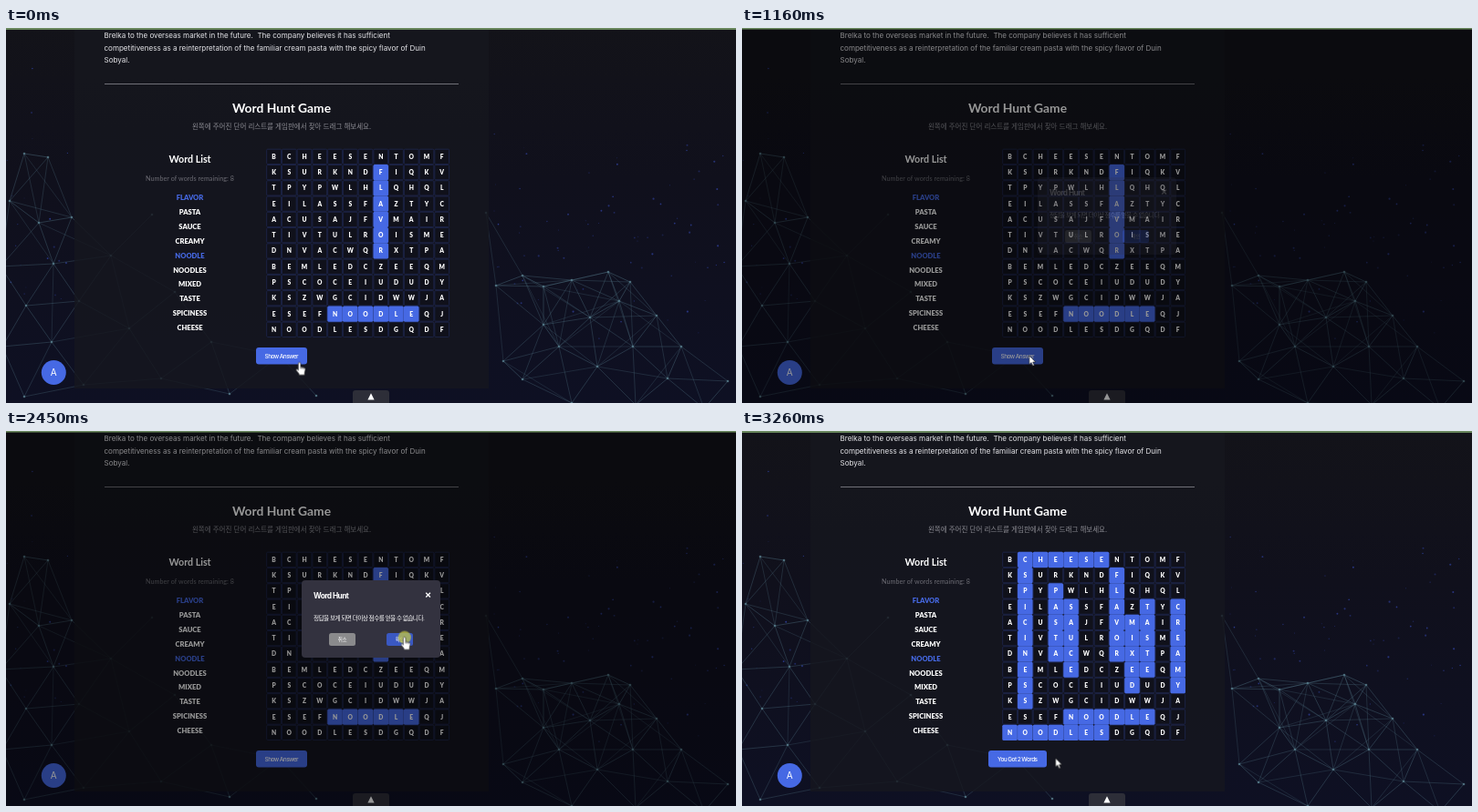
Recreate the animation shown at these times as an HTML page. Size 800x412 px, loop 3330 ms.

```html
<!DOCTYPE html>
<html lang="en">
<head>
<meta charset="utf-8">
<title>Word Hunt Game</title>
<style>
html, body { margin: 0; width: 100%; height: 100%; overflow: hidden; background: #0e0f1a; }
svg { display: block; width: 800px; height: 412px; }
text { white-space: pre; fill: #fff; }
.mid { text-anchor: middle; }
.body { font: 8.04px Inter, sans-serif; fill: #e6e6ea; }
.round { font-family: Lato, sans-serif; font-weight: 700; }
.heavy { font-weight: 900; }
.ko { font-family: "Noto Sans CJK KR", "Noto Sans CJK JP", "Noto Sans CJK", sans-serif; }
.tight { font: 500 6.5px Inter, sans-serif; letter-spacing: -.57px; }
.small { font-size: 5.6px; letter-spacing: -.5px; font-weight: 500; }
.blue { fill: #4669e4; }
.cell { fill: #10111b; stroke: #1f2850; stroke-width: .8; }

.cursor, .arrow, .hand, .tap, .shade, .dialog, .hover, .before, .after {
  animation: 3330ms step-end infinite;
}
.cursor { animation-name: travel; }
.arrow { animation-name: arrow; }
.hand { animation-name: hand; }
.tap { animation-name: tap; }
.shade { animation-name: shade; }
.dialog { animation-name: dialog; }
.hover { animation-name: hover; }
.before { animation-name: before; }
.after { animation-name: after; }

@keyframes travel {
  0% { transform: translate(321.8px, 367.5px); animation-timing-function: steps(8); }
  16.8% { transform: translate(314.8px, 360px); }
  46.5% { transform: translate(344px, 316.5px); animation-timing-function: steps(3); }
  52.8% { transform: translate(412px, 256px); animation-timing-function: steps(4); }
  61.2% { transform: translate(447px, 230.5px); animation-timing-function: steps(3); }
  67.5% { transform: translate(436.8px, 226.5px); }
  87.6% { transform: translate(436.8px, 226.5px); animation-timing-function: steps(2); }
  91.8% { transform: translate(386px, 302px); animation-timing-function: steps(3); }
  97.8%, 100% { transform: translate(343.6px, 359.5px); }
}
@keyframes arrow {
  0% { opacity: 0; } 34.5% { opacity: 1; } 63.3% { opacity: 0; } 95.7%, 100% { opacity: 1; }
}
@keyframes hand {
  0% { opacity: 1; } 34.5% { opacity: 0; } 63.3% { opacity: 1; } 95.7%, 100% { opacity: 0; }
}
@keyframes tap {
  0% { opacity: 0; } 26.4% { opacity: 1; } 32.7% { opacity: 0; }
  73.5% { opacity: 1; } 77.7%, 100% { opacity: 0; }
}
@keyframes shade {
  0% { opacity: 0; } 32.7% { opacity: .4; } 34.5% { opacity: 1; }
  79.8% { opacity: .96; } 82.2% { opacity: .5; } 84%, 100% { opacity: 0; }
}
@keyframes dialog {
  0% { opacity: 0; } 34.5% { opacity: .2; } 36.6% { opacity: .7; } 38.7% { opacity: 1; }
  77.7% { opacity: .9; } 79.8% { opacity: .45; } 82.2%, 100% { opacity: 0; }
}
@keyframes hover { 0% { fill: #4669e4; } 63.3%, 100% { fill: #3a58c2; } }
@keyframes before { 0% { opacity: 1; } 77.7%, 100% { opacity: 0; } }
@keyframes after { 0% { opacity: 0; } 77.7%, 100% { opacity: 1; } }
</style>
</head>
<body>
<svg viewBox="0 0 800 412">
  <defs>
    <linearGradient id="sky" x2="0" y2="1">
      <stop offset="0" stop-color="#131319"/>
      <stop offset=".4" stop-color="#10101c"/>
      <stop offset="1" stop-color="#0e1023"/>
    </linearGradient>
  </defs>

  <rect width="800" height="412" fill="url(#sky)"/>
  <g id="stars" fill="#2f3f98"/>
  <g id="mesh" stroke="#4f7080" stroke-width=".9" fill="#5f8796"/>
  <rect x="75" width="454" height="396" fill="#16171f" fill-opacity=".8"/>
  <rect width="800" height="2" fill="#67855b"/>

  <text class="body" x="107.5" y="11">Brelka to the overseas market in the future.  The company believes it has sufficient</text>
  <text class="body" x="107.5" y="24.5">competitiveness as a reinterpretation of the familiar cream pasta with the spicy flavor of Duin</text>
  <text class="body" x="107.5" y="38">Sobyal.</text>
  <rect x="108" y="61" width="388" height="1" fill="#717178"/>

  <text class="round mid" x="302" y="93" font-size="13.8">Word Hunt Game</text>
  <text class="ko mid" lang="ko" x="302" y="111.3" font-size="7.5" style="fill:#8b8b92">왼쪽에 주어진 단어 리스트를 게임판에서 찾아 드래그 해보세요.</text>
  <text class="round mid" x="201.5" y="148.3" font-size="10.7">Word List</text>
  <text class="mid" x="201.5" y="168.4" style="font:7.1px Lato,sans-serif;fill:#6d6d75;letter-spacing:.1px">Number of words remaining: 8</text>
  <g id="list" class="round heavy mid" font-size="7.6"/>

  <g id="cells"/>
  <g id="found" class="blue"/>
  <g id="answers" class="blue after"/>
  <g id="letters" class="round heavy mid" font-size="6.7"/>

  <g class="before">
    <rect class="blue" x="274" y="351" width="56" height="18.5" rx="3"/>
    <text class="tight mid" x="301.8" y="362.7">Show Answer</text>
  </g>
  <g class="after">
    <rect class="blue" x="270" y="351" width="64" height="18.5" rx="3"/>
    <text class="tight mid" x="301.8" y="362.7">You Got 2 Words</text>
  </g>

  <circle class="blue" cx="52.3" cy="378.5" r="13.5"/>
  <text class="mid" x="52.3" y="382.1" style="font:10px Inter,sans-serif">A</text>
  <path d="M380 412V401q0-3 3-3H417q3 0 3 3V412Z" fill="#2d2e38"/>
  <path d="M400 401.3L403.6 408.6H396.4Z" fill="#fff"/>

  <rect class="shade" y="1" width="800" height="411" fill="#000" fill-opacity=".41"/>

  <g class="dialog">
    <rect x="324" y="164" width="152" height="85" rx="4" fill="#33323f"/>
    <text x="337" y="184.3" style="font:700 8.4px Inter,sans-serif;letter-spacing:-.6px">Word Hunt</text>
    <path d="M460.2 177.7l4.8 4.8m0-4.8l-4.8 4.8" stroke="#fff" stroke-width="1.3"/>
    <text class="ko" lang="ko" x="337" y="207.6" font-size="6.7" font-weight="500" letter-spacing="-.6">정답을 보게 되면 더이상 점수를 얻을 수 없습니다.</text>
    <rect x="354" y="222" width="29" height="14" rx="2.5" fill="#8a8a8c"/>
    <text class="ko small mid" lang="ko" x="368.4" y="231">취소</text>
    <rect class="hover" x="417" y="222" width="29" height="14" rx="2.5"/>
    <text class="ko small mid" lang="ko" x="431.4" y="231">확인</text>
  </g>

  <g class="cursor">
    <circle class="tap" cy=".3" r="7" fill="#c3c545" fill-opacity=".75"/>
    <path class="arrow" d="M0 0V9.6L2.2 7.6 3.8 11.2 5.4 10.5 3.9 7H6.9Z" fill="#fff" stroke="#111" stroke-width=".6"/>
    <g class="hand" stroke="#222" stroke-width=".6">
      <path d="M-1.5.8C-1.5-.4 1-.4 1 .8V4.8L5 5.7Q6.4 6.2 6.2 7.6L5.4 11.5V13.8H-.8V12.3L-3.8 8.6C-4.3 7.6-3.2 6.9-2.4 7.6L-1.5 8.5Z" fill="#fff"/>
      <path d="M1 4.8V7M2.7 5.4V7.2M4.4 5.8V7.4" fill="none"/>
    </g>
  </g>
</svg>

<script>
const $ = id => document.getElementById(id);

function add(parent, tag, attrs, text = "") {
  const el = document.createElementNS("http://www.w3.org/2000/svg", tag);
  for (const k in attrs) el.setAttribute(k, attrs[k]);
  el.textContent = text;
  parent.append(el);
}

// Background network: nearby nodes are joined
const nodes = [
  [526, 203], [566, 272], [537, 283], [589, 284], [620, 277], [660, 268], [684, 279],
  [589, 326], [545, 366], [606, 350], [640, 318], [672, 300], [713, 316], [687, 350],
  [648, 372], [740, 350], [725, 385], [791, 388], [765, 418], [690, 414], [620, 412], [566, 386],
  [20, 138], [46, 142], [4, 190], [72, 208], [36, 214], [52, 259], [-6, 262],
  [22, 305], [80, 300], [-4, 350], [50, 345], [20, 405], [85, 392], [115, 250],
  [135, 330], [160, 205], [185, 290], [170, 385], [225, 345], [245, 402], [300, 360], [340, 404]
];
nodes.forEach(([x, y], i) => {
  add($("mesh"), "circle", { cx: x, cy: y, r: 1.3, stroke: "none", opacity: .75 });
  for (const [u, v] of nodes.slice(i + 1)) {
    const d = Math.hypot(u - x, v - y);
    if (d < 88) add($("mesh"), "line", { x1: x, y1: y, x2: u, y2: v, opacity: .62 - d / 250 });
  }
});

let seed = 11;
const rand = () => (seed = seed * 16807 % 2147483647) / 2147483647;
for (let i = 0; i < 95; i++) {
  const right = i < 75;
  add($("stars"), "circle", {
    cx: right ? 535 + rand() * 265 : rand() * 75,
    cy: right ? 110 + (rand() + rand()) * 120 : 20 + rand() * 300,
    r: .4 + rand() * .7,
    opacity: .3 + rand() * .6
  });
}

// Word list
const solved = ["FLAVOR", "NOODLE"];
"FLAVOR PASTA SAUCE CREAMY NOODLE NOODLES MIXED TASTE SPICINESS CHEESE".split(" ").forEach((word, i) => {
  const style = solved.includes(word) ? "fill:#4669e4" : "";
  add($("list"), "text", { x: 201.5, y: 189.2 + i * 15.86, style }, word);
});

// Board
const W = 16.74, H = 17.27, X0 = 285.2, Y0 = 132.7;
const rows = `BCHEESENTOMF KSURKNDFIQKV TPYPWLHLQHQL EILASSFAZTYC
ACUSAJFVMAIR TIVTULROISME DNVACWQRXTPA BEMLEDCZEEQM
PSCOCEIUDUDY KSZWGCIDWWJA ESEFNOODLEQJ NOODLESDGQDF`.split(/\s/);
rows.forEach((row, r) => [...row].forEach((ch, c) => {
  const x = X0 + c * W, y = Y0 + r * H;
  add($("cells"), "rect", { class: "cell", x: x + .5, y: y + .5, width: W - 1, height: H - 1, rx: 1 });
  add($("letters"), "text", { x: x + W / 2, y: y + H / 2 + 2.5 }, ch);
}));

function mark(group, col, row, length, down) {
  for (let i = 0; i < length; i++) {
    const c = col + (down ? 0 : i), r = row + (down ? i : 0);
    add(group, "rect", { x: X0 + c * W + .1, y: Y0 + r * H, width: W - .2, height: H, rx: 1.5 });
  }
}
mark($("found"), 7, 1, 6, true);
mark($("found"), 4, 10, 6);
mark($("answers"), 1, 0, 6);
mark($("answers"), 0, 11, 7);
for (const [col, row, length] of [[1, 1, 9], [3, 2, 5], [4, 3, 5], [8, 4, 5], [9, 3, 5], [11, 3, 6]])
  mark($("answers"), col, row, length, true);
</script>
</body>
</html>
```
